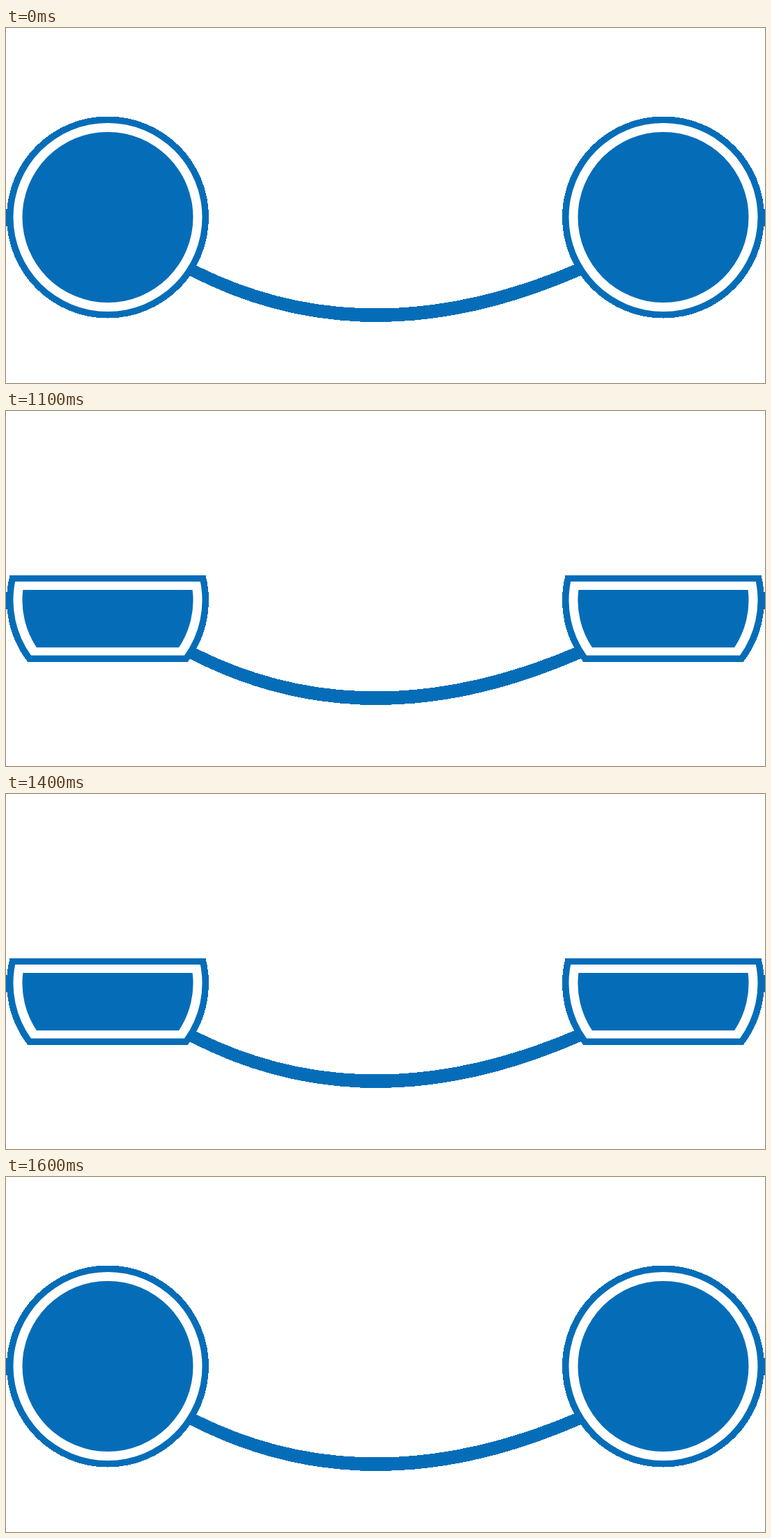
Recreate the animation shown at these times as an HTML page. Size 1093 by 512 pixels, loop 2 s.

```html
<!DOCTYPE html>
<html lang="en">
<head>
<meta charset="utf-8">
<title>Blink</title>
<style>
html, body { margin: 0; width: 100%; height: 100%; overflow: hidden; background: #fff; }
svg { display: block; width: 1093px; height: 512px; }
.blue { fill: #056db8; }
.white { fill: #fff; }
.crisp { shape-rendering: crispEdges; }
</style>
</head>
<body>
<svg viewBox="0 0 1093 512">
  <g id="open">
    <path class="blue crisp" d="M262 345L275 343Q523 467 819 341L832 343L828 357Q522 491 264 357Z"/>
    <g id="nubs" class="blue crisp">
      <rect x="0" y="261" width="3" height="25"/>
      <rect x="1090" y="261" width="3" height="25"/>
    </g>
    <path id="rim" class="blue crisp"/>
    <path id="ring" class="white"/>
    <path id="disc" class="blue"/>
  </g>
  <g id="shut" class="crisp">
    <path fill="#eee" d="M23 346L256 350V357.5L23 353ZM1070 346V356H843V350Z"/>
    <path class="blue" d="M23 336L256 341V351L23 347ZM1070 336V347L842 351L836 341Z"/>
    <path d="M257 346Q520 480.7 840 344.5" fill="none" stroke="#056db8" stroke-width="20"/>
  </g>
</svg>
<script>
const LOOP = 2000, BLINK = 1000, STEP = 100;
const CY = 273, CENTERS = [146.5, 946.5];
const RADII = { rim: 145.5, ring: 136, disc: 123 };

// Upper and lower cut of each layer, from open to nearly closed.
const LIDS = [
  { rim: [0, 512], ring: [0, 512], disc: [0, 512] },
  { rim: [182.5, 392], ring: [192, 383], disc: [200, 375.5] },
  { rim: [236.5, 362], ring: [246, 352.5], disc: [258, 341] },
  { rim: [291, 357], ring: [300.5, 347], disc: [311, 337] }
];
const SHUT = 4;
const POSES = [1, 2, 3, SHUT, 2, 1];

const el = id => document.getElementById(id);

// Circle cut flat at the given heights.
function slice(cx, r, [top, bottom]) {
  const a = Math.max(top, CY - r), b = Math.min(bottom, CY + r);
  const half = y => Math.sqrt(Math.max(0, r * r - (y - CY) ** 2));
  const arc = `A${r} ${r} 0 0 1 `;
  return `M${cx - half(a)} ${a}H${cx + half(a)}${arc}${cx + half(b)} ${b}` +
    `H${cx - half(b)}${arc}${cx - half(a)} ${a}Z`;
}

function show(node, on) {
  node.style.display = on ? "" : "none";
}

function draw(ms) {
  const t = ms % LOOP;
  const pose = t < BLINK ? 0 : POSES[Math.floor((t - BLINK) / STEP)] || 0;
  show(el("open"), pose !== SHUT);
  show(el("shut"), pose === SHUT);
  if (pose === SHUT) return;
  const lid = LIDS[pose];
  show(el("nubs"), lid.rim[0] < 261);
  for (const id in RADII) {
    el(id).setAttribute("d", CENTERS.map(cx => slice(cx, RADII[id], lid[id])).join(""));
  }
}

const start = performance.now();
function tick() {
  draw(performance.now() - start);
  requestAnimationFrame(tick);
}
tick();
</script>
</body>
</html>
```
